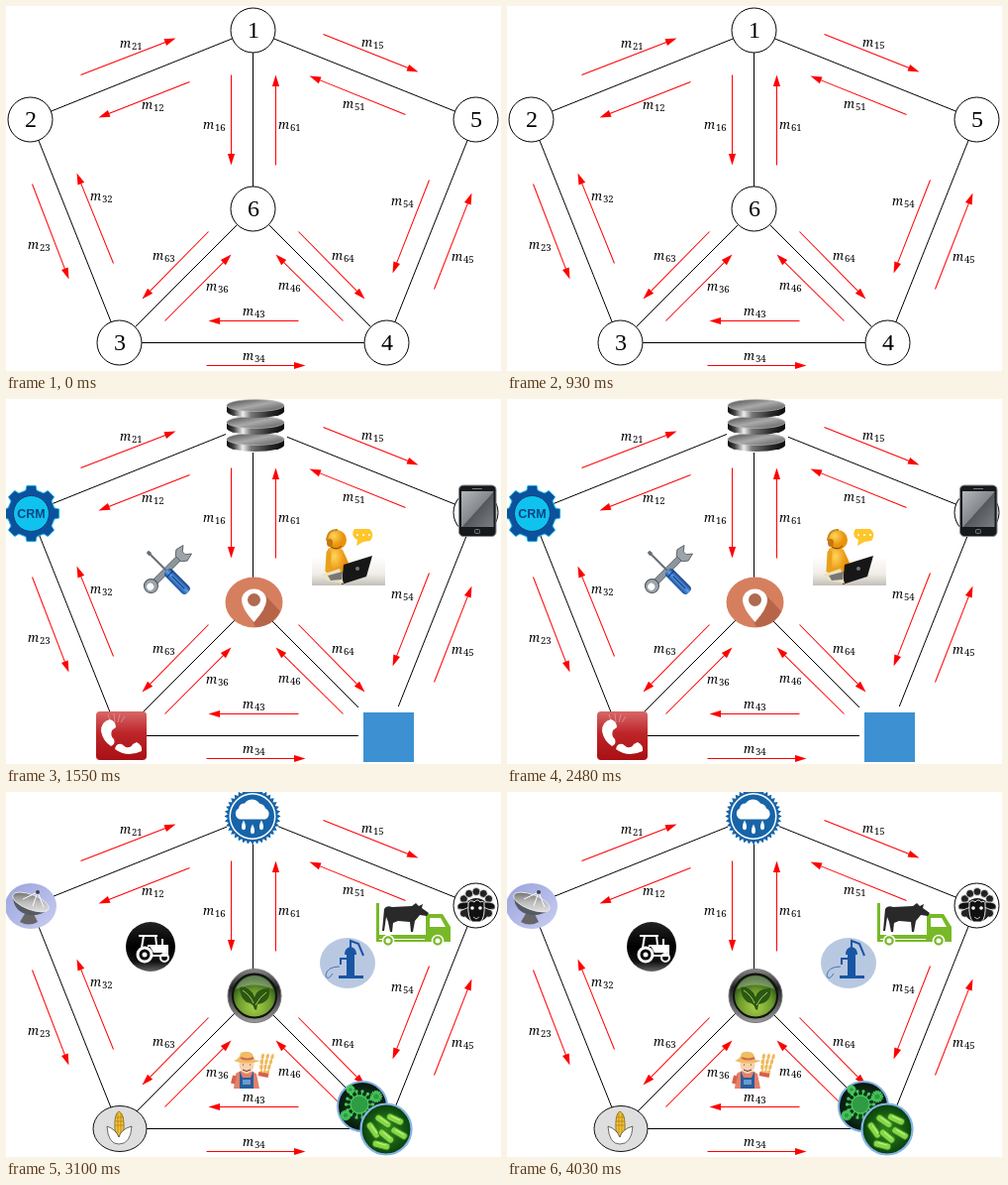
Animation, 500 px wide and 368 px high, one loop 4.65 s. Source, as an HTML page:

```html
<!DOCTYPE html>
<html lang="en">
<head>
<meta charset="utf-8">
<title>Message network</title>
<style>
html, body { margin: 0; width: 100%; height: 100%; overflow: hidden; background: #fff; }
svg { display: block; width: 100%; height: 100%; }
.num { font: 24px "Liberation Serif", serif; text-anchor: middle; }
.msg { font: italic 12.3px "Noto Serif", serif; }
.sub { font: 9.6px "Noto Serif", serif; }
</style>
</head>
<body>
<svg id="stage" viewBox="0 0 500 368" xmlns="http://www.w3.org/2000/svg">
<defs>
  <linearGradient id="steel">
    <stop offset="0" stop-color="#0a0a0a"/><stop offset=".12" stop-color="#444"/><stop offset=".28" stop-color="#eee"/>
    <stop offset=".42" stop-color="#777"/><stop offset=".75" stop-color="#2a2a2a"/><stop offset="1" stop-color="#0a0a0a"/>
  </linearGradient>
  <linearGradient id="lid" x2="1" y2="1"><stop stop-color="#444"/><stop offset=".5" stop-color="#aaa"/><stop offset="1" stop-color="#555"/></linearGradient>
  <linearGradient id="red" x2="0" y2="1"><stop stop-color="#d76868"/><stop offset=".45" stop-color="#bd2529"/><stop offset="1" stop-color="#a90f14"/></linearGradient>
  <linearGradient id="screen" x2="1" y2="1"><stop stop-color="#b4b8bb"/><stop offset=".5" stop-color="#85898d"/><stop offset=".52" stop-color="#54585c"/><stop offset="1" stop-color="#7b7f83"/></linearGradient>
  <linearGradient id="grip" x2="1" y2="0"><stop stop-color="#164c9c"/><stop offset=".5" stop-color="#5b9ce6"/><stop offset="1" stop-color="#113c86"/></linearGradient>
  <linearGradient id="floor" x2="0" y2="1"><stop offset=".5" stop-color="#fff"/><stop offset=".8" stop-color="#f1eee8"/><stop offset="1" stop-color="#c4c0b9"/></linearGradient>
  <linearGradient id="coal" x2="0" y2="1"><stop stop-color="#222"/><stop offset=".5" stop-color="#000"/><stop offset=".8" stop-color="#111"/><stop offset="1" stop-color="#666"/></linearGradient>
  <linearGradient id="rim" x2="0" y2="1"><stop stop-color="#888"/><stop offset=".35" stop-color="#222"/><stop offset="1" stop-color="#999"/></linearGradient>
  <linearGradient id="sky" x2="1" y2="1"><stop stop-color="#9aa3dc"/><stop offset="1" stop-color="#c9cdf2"/></linearGradient>
  <linearGradient id="dish" x2="1" y2="1"><stop stop-color="#555"/><stop offset=".5" stop-color="#bbb"/><stop offset="1" stop-color="#eee"/></linearGradient>
  <radialGradient id="moss" cy=".75" r=".65"><stop stop-color="#a9cf4b"/><stop offset=".6" stop-color="#6b9a2c"/><stop offset="1" stop-color="#234d10"/></radialGradient>
  <radialGradient id="orange" cx=".35" cy=".3"><stop stop-color="#ffd65a"/><stop offset="1" stop-color="#e9920c"/></radialGradient>
  <radialGradient id="germ"><stop stop-color="#1d5a2c"/><stop offset="1" stop-color="#04140a"/></radialGradient>
  <radialGradient id="pond"><stop stop-color="#2f8b1d"/><stop offset="1" stop-color="#0a400c"/></radialGradient>
</defs>
<rect width="500" height="368" fill="#fff"/>
<g id="net"></g>

<g id="plain"></g>

<g id="office">
  <path d="M222 0h62v54h-62zM356 310h60v58h-60z" fill="#fff"/>
  <g id="disks"></g>
  <g transform="translate(25.500 115.500)">
    <path id="gear" fill="#0d519c" stroke="#19b5e4" stroke-width="1"/>
    <circle r="18" fill="#0fc3ee" stroke="#083d7e" stroke-width="1"/>
    <text y="4.300" text-anchor="middle" font-family="Liberation Sans, sans-serif" font-weight="bold" font-size="12.500" fill="#0b4388">CRM</text>
  </g>
  <circle cx="474.500" cy="114.500" r="22.500" fill="#fff" stroke="#000"/>
  <rect x="457.500" y="87" width="37.500" height="51.500" rx="4.500" fill="#161a1d" stroke="#85898c"/>
  <rect x="460" y="93" width="32.500" height="36" fill="url(#screen)"/>
  <path d="M471 90.500h10" stroke="#777"/>
  <rect x="473.500" y="131.500" width="5" height="4" rx="1" fill="#222" stroke="#777"/>
  <g>
    <ellipse cx="250.500" cy="205" rx="29" ry="25.500" fill="#d67f5f"/>
    <path d="M259 195L277 214Q270 229 252 230L249 224Z" fill="#b76549"/>
    <path d="M250.500 225Q238 211 238 203A12.500 11.500 0 0 1 263 203Q263 211 250.500 225Z" fill="#fff"/>
    <circle cx="250.500" cy="202.500" r="6.500" fill="#b06a50"/>
  </g>
  <rect x="91" y="315" width="51" height="49" rx="4" fill="url(#red)"/>
  <path d="M103 318l3 9M109 317l1 9M115 318l-2 8M120 320l-4 6" stroke="#d99" stroke-width=".8"/>
  <path d="M105 323Q96 325 96 335Q98 345 106 350Q111 348 109 343Q105 340 107 334L111 331Q111 325 105 323Z" fill="#fff"/>
  <path d="M110 353Q111 347 117 348L121 351Q126 352 128 348L132 346Q138 349 137 355Q122 362 110 353Z" fill="#fff"/>
  <rect x="361" y="316" width="51" height="50" fill="#3d91d2"/>

  <g transform="translate(162 173) rotate(-45)">
    <rect x="-3" y="-19" width="6" height="38" fill="#8d969d" stroke="#4a535a" stroke-width=".8" transform="rotate(90)"/>
    <path d="M17-4L22-8L30-6L25-2V2L30 6L22 8L17 4Z" fill="#9ca4aa" stroke="#4a535a" stroke-width=".8"/>
    <circle cx="-22" r="7" fill="#9ca4aa" stroke="#4a535a"/><circle cx="-23" r="3.500" fill="#fff"/>
    <path d="M-1.500-27h3L2-23H1V1h-2v-24h-1z" fill="#666e75"/>
    <rect x="-5" y="0" width="10" height="31" rx="4" fill="url(#grip)"/>
    <path d="M-4 5h8M0 8v18" stroke="#0e3677"/>
  </g>

  <rect x="309" y="129" width="74" height="59" fill="url(#floor)"/>
  <path d="M325 151Q332 147 340 152L346 165L337 181L324 177Z" fill="url(#orange)"/>
  <path d="M326 155L325 172L341 174" fill="none" stroke="#e9a01c" stroke-width="5" stroke-linecap="round"/>
  <circle cx="334" cy="142" r="10" fill="url(#orange)"/>
  <path d="M324 143Q325 131 335 132" fill="none" stroke="#c98a22" stroke-width="2"/>
  <ellipse cx="327" cy="145" rx="3" ry="4" fill="#c5760f"/>
  <path d="M328 149Q334 153 339 148" fill="none" stroke="#744a16"/>
  <path d="M352 131H367Q373 136 368 143L361 144L354 148L355 142Q347 138 352 131Z" fill="#ffc629"/>
  <path d="M354 137h2m4 0h2m4 0h2" stroke="#fff" stroke-width="2"/>
  <path d="M341 167L370 158L364 179L339 187Z" fill="#171717"/>
  <path d="M319 177L337 171L341 186L325 183Z" fill="#eee1bd"/>
  <path d="M325 178L340 174L339 182L328 183Z" fill="#777"/>
  <circle cx="355" cy="171" r="2" fill="#777"/>
</g>

<g id="farm">
  <g transform="translate(249 24.500)">
    <circle r="28" fill="#fff"/>
    <path id="rays" fill="#1764a8"/>
    <circle r="23.500" fill="#fff"/><circle r="22" fill="#1764a8"/>
    <path d="M-13 3A6 6 0 0 1-14-8A6 6 0 0 1-8-13A9 9 0 0 1 7-13Q12-12 13-8A6 6 0 0 1 13 3Z" fill="#fff"/>
    <g id="drops" fill="#fff"></g>
  </g>
  <ellipse cx="25" cy="115" rx="26" ry="23" fill="url(#sky)"/>
  <path d="M20 121L14 131Q23 136 32 131L27 121Z" fill="#666"/>
  <path d="M7 104Q7 121 24 124Q36 125 43 118Z" fill="#555a63"/>
  <ellipse cx="25" cy="111" rx="19.500" ry="7.500" fill="url(#dish)" stroke="#eee" stroke-width=".8" transform="rotate(21 25 111)"/>
  <path d="M17 108L32 101L27 115M32 101L38 116" fill="none" stroke="#fff"/>
  <circle cx="32" cy="101" r="2" fill="#444"/>

  <circle cx="474.500" cy="114.500" r="22.500" fill="#fff" stroke="#000"/>
  <g transform="translate(475 115)">
    <g id="wool" fill="#222"></g>
    <ellipse cy="4" rx="13" ry="12" fill="#222"/>
    <path d="M-8-4Q-21-5-19 3Q-13 5-7 1M8-4Q21-5 19 3Q13 5 7 1" fill="#111" stroke="#fff" stroke-width=".8"/>
    <path d="M-8-3Q-6-7-2-4Q1-8 4-4Q8-6 8-2Q9 12 4 16H-4Q-9 12-8-3Z" fill="#111" stroke="#fff" stroke-width=".9"/>
    <circle cx="-4" cy="2" r="1.800" fill="#fff"/><circle cx="4" cy="2" r="1.800" fill="#fff"/>
    <path d="M-3 11L0 13L3 11" fill="none" stroke="#fff" stroke-width=".7"/>
  </g>

  <path d="M374 112h3v32h47V123H441L449 136V151H374Z" fill="#78b928"/>
  <path d="M377 112H424V144H377Z" fill="#fff"/>
  <path d="M428 127H439L444 136H428Z" fill="#fff"/>
  <path d="M377 148.500h46" stroke="#fff"/>
  <g fill="#78b928" stroke="#fff" stroke-width="1.500"><circle cx="386" cy="150" r="5.500"/><circle cx="436" cy="150" r="5.500"/></g>
  <g fill="#fff"><circle cx="386" cy="150" r="2.500"/><circle cx="436" cy="150" r="2.500"/></g>
  <path d="M382 118Q384 114 390 116L410 115L414 112L417 115L421 113L420 117L427 122L425 125L418 124L413 130L411 141H409L408 131L396 130L391 132L390 141H388L386 131L384 126L382 140H380Z" fill="#292929"/>

  <ellipse cx="345" cy="172.500" rx="28" ry="25.500" fill="#b9c8e1"/>
  <path d="M344 164H352V185H361V188H336V185H344Z" fill="#1855a4"/>
  <path d="M342 164Q342 157 348 156Q354 157 354 164Z" fill="#1855a4"/>
  <path d="M348 157V150L356 153L361 165M344 168H338V174" fill="none" stroke="#1855a4" stroke-width="2"/>
  <path d="M337 176Q324 176 323 185Q325 191 330 183" fill="none" stroke="#4675b5"/>

  <circle cx="146" cy="156" r="25" fill="url(#coal)"/>
  <g fill="none" stroke="#fff" stroke-width="2">
    <path d="M137 157L139 145H151L152 154M134 145H153" />
    <path d="M143 155H163V165H147M158 155V148" />
    <circle cx="140" cy="164" r="7" stroke-width="3"/><circle cx="160" cy="167" r="4"/>
  </g>
  <path d="M145 155H163V162H149Z" fill="#fff"/><circle cx="140" cy="164" r="2.500" fill="#fff"/>

  <circle cx="251" cy="205.500" r="27" fill="url(#rim)" stroke="#777"/>
  <circle cx="251" cy="205.500" r="22" fill="url(#moss)" stroke="#111" stroke-width="2"/>
  <path d="M251 219Q250 213 243 212Q236 207 236 196Q248 197 251 207Q253 198 266 198Q268 212 254 214L253 220Z" fill="#2b5712"/>
  <path d="M239 200Q247 205 250 213M263 202Q256 207 252 215" fill="none" stroke="#a3cc5b"/>
  <path d="M232 199A20 20 0 0 1 270 199Q251 190 232 199Z" fill="#fff" opacity=".3"/>

  <g id="wheat" fill="none" stroke="#efb95a" stroke-width="3" stroke-linecap="round"></g>
  <path d="M232 284Q241 277 253 284L256 299H230Z" fill="#e2806a"/>
  <path d="M231 286l-2 8M255 284l10 2" stroke="#d9604a" stroke-width="4"/>
  <path d="M236 281V299H250V281L247 288H239Z" fill="#285d9d"/>
  <rect x="239" y="290" width="8" height="5" fill="#6b9bcb"/>
  <ellipse cx="243" cy="275" rx="7.500" ry="9" fill="#f8d2ae"/>
  <path d="M230 271Q236 269 237 263Q244 260 249 264L251 270L257 271Q243 276 230 271Z" fill="#efbd66"/>
  <path d="M237 268Q244 271 250 268" fill="none" stroke="#d2694c" stroke-width="2"/>
  <path d="M239 275h1m6 0h1M239 280Q243 283 247 280" stroke="#633" fill="none"/>

  <ellipse cx="115" cy="339.500" rx="27" ry="23" fill="#dedede" stroke="#111"/>
  <path d="M110 341Q109 324 114 322Q120 324 119 342L114 349Z" fill="#f3c33a" stroke="#7d611b" stroke-width=".8"/>
  <path d="M113 324v20m3-20v20M110 328h9m-9 4h9m-9 4h9" stroke="#a97a14" stroke-width=".7"/>
  <path d="M114 355Q103 355 102 337Q111 340 114 348Q116 340 127 337Q126 355 114 355Z" fill="#fff" stroke="#444" stroke-width=".8"/>

  <g transform="translate(360 317)">
    <circle r="25" fill="url(#germ)" stroke="#80aee0" stroke-width="2"/>
    <g id="virus" stroke="#48c95a" stroke-width="1.300" fill="#5fd86c"></g>
  </g>
  <g transform="translate(384 340)">
    <circle r="25.500" fill="url(#pond)" stroke="#86b5e8" stroke-width="2.200"/>
    <g id="rods" fill="#86d844" stroke="#317b20"></g>
  </g>
</g>
</svg>
<script>
const $ = id => document.getElementById(id);
const nodes = [[249.5, 24.5], [24.5, 114.5], [114.5, 339.5], [384.5, 339.5], [474.5, 114.5], [249.5, 204.5]];
const edges = ["12", "15", "16", "23", "34", "45", "36", "46"];
// label, arrow start, arrow tip, label position
const messages = [
  ["21", 75, 69, 171, 32, 115, 42], ["12", 185, 76, 93, 112, 137, 104],
  ["16", 227, 69, 227, 160, 199, 124], ["61", 272, 160, 272, 69, 275, 124],
  ["15", 320, 28, 416, 66, 359, 41], ["51", 403, 109, 306, 70, 340, 103],
  ["32", 108, 259, 71, 168, 85, 196], ["23", 26, 179, 63, 275, 22, 245],
  ["54", 427, 175, 390, 269, 389, 201], ["45", 432, 285, 470, 188, 450, 257],
  ["63", 204, 227, 137, 295, 148, 256], ["36", 160, 317, 227, 250, 202, 287],
  ["64", 295, 227, 362, 295, 329, 256], ["46", 340, 317, 272, 250, 275, 286],
  ["43", 295, 317, 204, 317, 239, 312], ["34", 202, 362, 302, 362, 239, 357]
];
const repeat = (n, draw) => Array.from({ length: n }, (_, i) => draw(i)).join("");
const polar = (r, a) => [r * Math.cos(a), r * Math.sin(a)].map(v => v.toFixed(2));
const ring = (n, r, draw) => repeat(n, i => draw(...polar(r, i * 2 * Math.PI / n)));

function edge(pair) {
  const [a, b] = [...pair].map(k => nodes[k - 1]);
  return `<path d="M${a}L${b}" stroke="#000"/>`;
}

function message([id, x1, y1, x2, y2, x, y]) {
  const angle = Math.atan2(y2 - y1, x2 - x1) * 180 / Math.PI;
  const length = Math.hypot(x2 - x1, y2 - y1);
  return `<g transform="translate(${x2 + .5} ${y2 + .5}) rotate(${angle})">
    <path d="M${-length} 0H-9" stroke="#f00"/>
    <path d="M0 0L-11.5-3.6V3.6Z" fill="#f00"/></g>
    <text class="msg" x="${x}" y="${y}">m</text>
    <text class="sub" x="${x + 12}" y="${y + 1.5}">${id}</text>`;
}

function cog(teeth, inner, outer) {
  const step = 2 * Math.PI / teeth;
  const parts = [[inner, -.3], [outer, -.2], [outer, .2], [inner, .3]];
  return "M" + Array.from({ length: teeth }, (_, i) =>
    parts.map(([r, o]) => polar(r, (i + o) * step)).join("L")).join("L") + "Z";
}

$("net").innerHTML = edges.map(edge).join("") + messages.map(message).join("");
$("plain").innerHTML = nodes.map(([x, y], i) =>
  `<circle cx="${x}" cy="${y}" r="22.5" fill="#fff" stroke="#000"/>
   <text class="num" x="${x + .5}" y="${y + 7.5}">${i + 1}</text>`).join("");

$("disks").innerHTML = repeat(3, i => {
  const y = 40.5 - i * 17;
  return `<path d="M223 ${y}V${y + 6}A29 6.5 0 0 0 281 ${y + 6}V${y}Z" fill="url(#steel)"/>
    <ellipse cx="252" cy="${y}" rx="29" ry="6" fill="url(#lid)" stroke="#bbb" stroke-width=".7"/>`;
});
$("gear").setAttribute("d", cog(8, 24, 28.5));
$("rays").setAttribute("d", "M" + Array.from({ length: 72 }, (_, i) =>
  polar(i % 2 ? 25 : 28.5, i * Math.PI / 36)).join("L") + "Z");
$("drops").innerHTML = repeat(3, i => {
  const x = -9 + i * 9, y = i % 2 ? 8 : 4;
  return `<path d="M${x} ${y}c-7 13 7 13 0 0z"/>`;
});
$("wool").innerHTML = ring(12, 14.5, (x, y) => y > 9 ? "" :
  `<circle cx="${x}" cy="${y}" r="4" stroke="#fff" stroke-width=".7"/>`);
$("wheat").innerHTML = repeat(3, i =>
  `<path d="M${258 + i * 3} 284Q${257 + i * 5} 273 ${260 + i * 5} 264" stroke-dasharray="2 3.5"/>
   <path d="M${258 + i * 3} 285L${260 + i * 5} 264" stroke-width="1"/>`);
$("virus").innerHTML = [[-3, -2, 9], [14, -10, 3.5], [-17, 9, 3], [-12, -17, 2.5], [9, 16, 3.5]].map(([x, y, r]) =>
  `<g transform="translate(${x} ${y})">${ring(14, r * 1.5, (a, b) =>
    `<path d="M0 0L${a} ${b}"/><circle cx="${a}" cy="${b}" r="${r / 9}"/>`)}<circle r="${r}" fill="#2f9c44"/></g>`).join("");
$("rods").innerHTML = [[-13, 1, 55], [-3, -8, 35], [9, -10, 25], [0, 7, 40], [13, 4, 30], [-5, 16, 15]].map(([x, y, a]) =>
  `<g transform="translate(${x} ${y}) rotate(${a})"><rect x="-9" y="-3.5" width="18" height="7" rx="3.5"/>
   <path d="M-5-1.2H5" stroke="#c6f08c"/></g>`).join("");

const scenes = ["plain", "office", "farm"].map($);
const hold = 1550;

function show(time) {
  const current = Math.floor(time / hold) % scenes.length;
  scenes.forEach((scene, i) => scene.style.display = i === current ? "" : "none");
}

let start;
function tick(now) {
  start ??= now;
  show(now - start);
  requestAnimationFrame(tick);
}
show(0);
requestAnimationFrame(tick);
</script>
</body>
</html>
```
